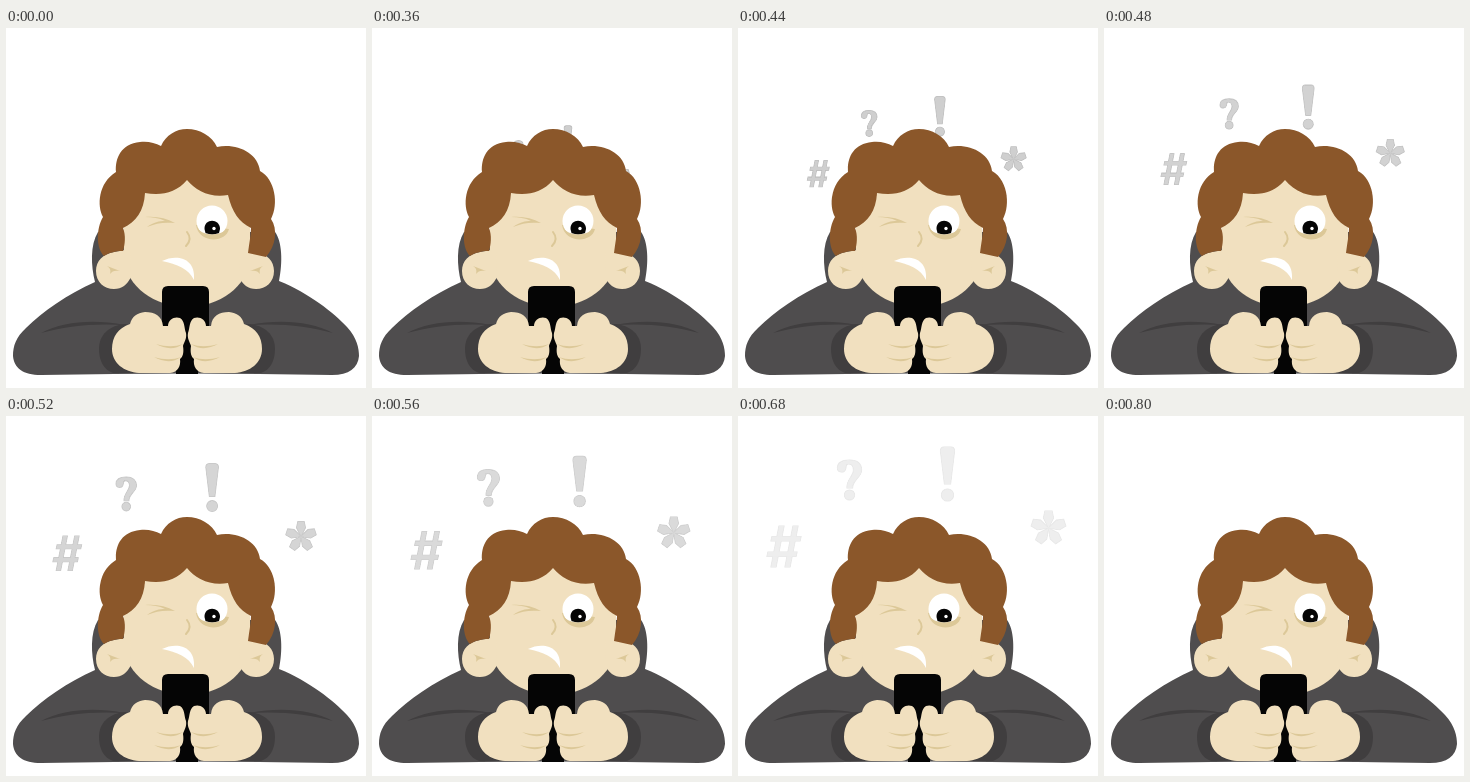
These frames come from a looping animation (360x360 px, 0.96 s). An HTML page:

```html
<!DOCTYPE html>
<html lang="en">
<head>
<meta charset="utf-8">
<title>Puzzled by the phone</title>
<style>
  html, body { margin: 0; width: 100%; height: 100%; overflow: hidden; background: #fff; }
  svg { display: block; width: 100vw; height: 100vh; }
  .skin { fill: #f1e0bf; }
  .crease { fill: none; stroke: #dcc898; stroke-width: 2; stroke-linecap: round; }
  .tan { fill: #dcc898; }
  .coat { fill: #4f4d4e; }
  .fold { fill: #403e3f; }
  .rim { stroke: #bcbcbc; }
  .edge { vector-effect: non-scaling-stroke; stroke-width: 1.2; }
</style>
</head>
<body>
<svg viewBox="0 0 360 360">
  <defs>
    <g id="ear">
      <path class="skin" d="M124 221L108 224C97 226 90 233 90 243C90 254 98 261 108 261C116 261 121 257 125 249Z"/>
      <path class="tan" d="M101 238L114 243C109 242 106 243 104 246C105 242 104 240 101 238Z"/>
    </g>
    <g id="arm">
      <path class="fold" d="M35 305C58 293 88 291 119 297C88 295 59 298 35 305Z"/>
      <path class="fold" d="M120 296C103 297 93 307 93 321C93 333 98 342 107 345H130V300Z"/>
    </g>
    <g id="hand">
      <path class="skin" d="M106 321C106 309 112 300 124 296C126 288 131 285 139 284C149 284 156 288 157 298H162C162 291 169 288 174 290C179 293 178 300 180 305C181 311 178 314 177 318C178 324 177 329 174 331C175 338 172 344 164 345H133C118 344 106 335 106 321Z"/>
      <path class="tan" d="M150 316C160 319 169 319 177 316C169 322 159 321 150 316ZM148 329C158 332 167 332 175 329C167 335 157 334 148 329Z"/>
    </g>
  </defs>
  <g id="marks"></g>

  <path class="coat" d="M89 254C85 238 84 217 92 204H269C276 213 277 234 273 253C303 265 328 285 341 299C351 310 353 320 353 328C352 340 343 347 326 347Q181 344 35 347C17 347 8 340 7 328C7 318 10 309 20 300C36 284 62 266 89 254Z"/>

  <path class="skin" d="M117 150H244V232C241 258 214 279 181 279C148 279 121 258 118 232Z"/>
  <use href="#ear"/>
  <use href="#ear" transform="translate(358 0) scale(-1 1)"/>
  <path fill="#8b572a" d="M98 228C90 220 90 201 97 189C91 178 92 155 110 144C109 130 115 116 134 114C142 113 149 115 155 118C160 107 170 101 181 101C194 101 206 108 211 119C231 115 252 125 254 143C269 151 273 176 265 191C272 201 270 218 260 229L242 225C243 216 245 207 245 200C233 194 226 184 222 167C204 170 190 163 181 152C170 165 155 168 139 165C138 183 130 194 117 200C120 207 119 217 117 223C110 223 102 225 98 228Z"/>

  <path class="tan" d="M139 189C150 188 160 190 169 195C158 194 150 195 141 199C148 194 153 193 159 193C153 190 147 189 139 189Z"/>
  <path class="crease" d="M181 204C185 209 184 214 180 218"/>
  <path class="tan" d="M190 197C193 216 220 215 223 201Z"/>
  <circle cx="206" cy="193" r="15.500" fill="#fff"/>
  <path class="tan" d="M192 201C198 208 214 208 221 201C218 212 197 213 192 201Z"/>
  <path fill="#050505" d="M198.500 201C198 190 214 190 214 201L213 205Q206 207.500 199.500 205Z"/>
  <circle cx="208" cy="200.500" r="1.700" fill="#fff"/>
  <path fill="#fff" d="M156 233C170 226 190 229 188 252C183 241 171 236 156 233Z"/>

  <use href="#arm"/>
  <use href="#arm" transform="translate(362 0) scale(-1 1)"/>
  <path fill="#050505" d="M156 264Q156 258 162 258H197Q203 258 203 264V299H192V346H170V299H156Z"/>
  <use href="#hand"/>
  <use href="#hand" transform="translate(362 0) scale(-1 1)"/>
</svg>
<script>
const LOOP = 960, STEP = 40, START = 360, REST = 680, END = 800;

const petal = turn => `<path transform="rotate(${turn})" d="M0 0L-5 -10L-3.500 -17H3.500L5 -10Z"/>`;

// Resting place, offset back to the start, and growth of each mark
const marks = [
  { x: 46, y: 130.5, dx: 61, dy: 27, grow: .65,
    art: '<path d="M-5 -20.500H0L-8 20.500H-13ZM9 -20.500H14L6 20.500H1Z"/>' +
         '<path d="M-12 -10H17L16 -5.500H-13ZM-16 5.500H13L12 10H-17Z"/>' },
  { x: 111.5, y: 64, dx: 35, dy: 56, grow: .64,
    art: '<path d="M-12 -12C-12 -18 -6 -20 0 -20C8 -20 12 -16 12 -10C12 -3 3 0 3 8H-2.500C-3 0 4 -4 4 -10C4 -14 2 -16 -1 -16C-4 -16 -3 -14 -4 -11C-5 -7 -12 -7 -12 -12Z"/>' +
         '<circle cx="0" cy="15" r="5"/>' },
  { x: 209.5, y: 58, dx: -13.5, dy: 54, grow: .48,
    art: '<path d="M-7 -23Q-7 -27 -3.500 -27H3.500Q7 -27 7 -23L3 10H-3Z"/><circle cx="0" cy="21" r="6"/>' },
  { x: 310.5, y: 112, dx: -62, dy: 34, grow: .5,
    art: [0, 72, 144, 216, 288].map(petal).join('') }
];

const layer = document.getElementById('marks');
layer.innerHTML = marks.map(m => {
  const rim = m.art.replace(/<(path|circle)/g, '<$1 class="edge"');
  return `<g><g class="rim">${rim}</g><g fill="#cecece">${m.art}</g></g>`;
}).join('');

function draw(time) {
  const t = Math.floor((time % LOOP) / STEP) * STEP;
  const shown = t >= START && t < END;
  layer.style.display = shown ? '' : 'none';
  if (!shown) return;

  const back = Math.max(0, (REST - t) / (REST - START)) ** 2;
  const age = (t - START) / 400;
  const held = t >= REST && t < REST + 2 * STEP ? .8 : age;
  layer.setAttribute('opacity', Math.max(.1, 1 - held * held));
  marks.forEach((m, i) => {
    const x = m.x + m.dx * back, y = m.y + m.dy * back;
    layer.children[i].setAttribute('transform', `translate(${x} ${y}) scale(${1 - m.grow * back})`);
  });
}

const begin = performance.now();
function tick() {
  draw(performance.now() - begin);
  requestAnimationFrame(tick);
}
tick();
</script>
</body>
</html>
```
